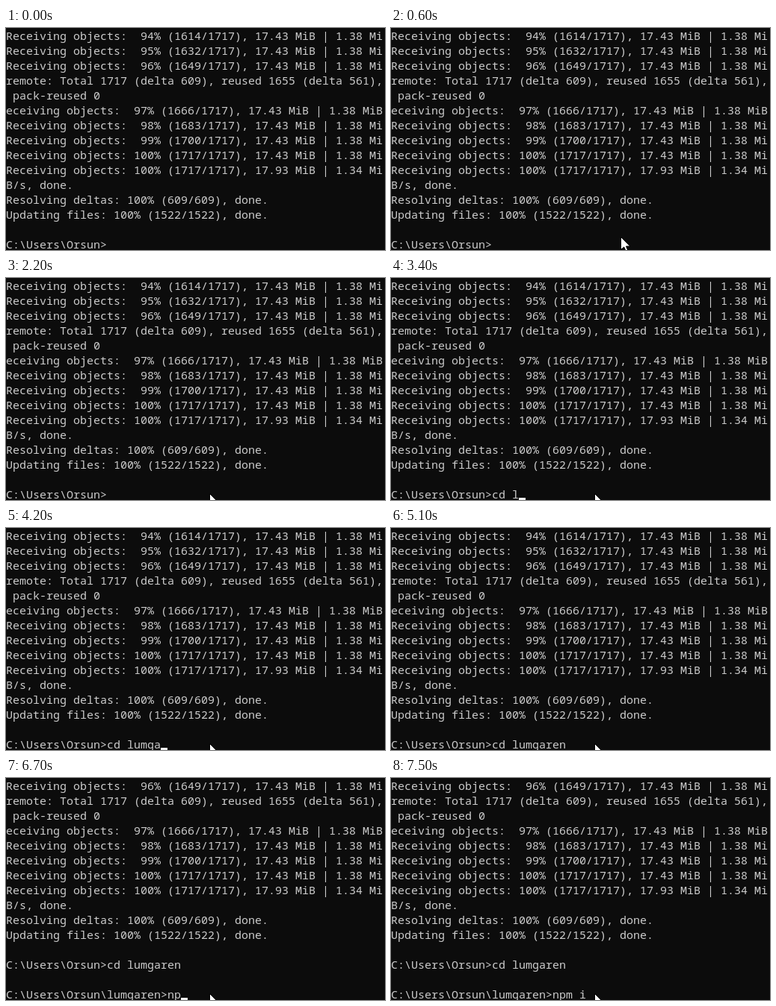
Recreate the animation shown at these times as an HTML page with a canvas. Size 507 px wide and 298 px high, loop 8 s.

```html
<!DOCTYPE html>
<html lang="en">
<head>
<meta charset="utf-8">
<title>Terminal</title>
<style>
html, body { margin: 0; width: 100%; height: 100%; overflow: hidden; background: #0c0c0c; }
canvas { display: block; }
</style>
</head>
<body>
<canvas id="screen" width="507" height="298"></canvas>
<script>
const ctx = document.getElementById("screen").getContext("2d");
const LOOP = 8000, STEP = 100, CELL = 9, ROW = 20, BASE = 16, ROWS = 15;
const HOME = "C:\\Users\\Orsun", DIR = "lumgaren", COMMAND = "cd " + DIR;
const ENTER = 5500;

const receiving = (percent, count, size = "17.43", rate = "1.38") =>
  `Receiving objects: ${String(percent).padStart(3)}% (${count}/1717), ${size} MiB | ${rate} Mi`;

const log = [
  receiving(94, 1614),
  receiving(95, 1632),
  receiving(96, 1649),
  "remote: Total 1717 (delta 609), reused 1655 (delta 561),",
  " pack-reused 0",
  receiving(97, 1666).slice(1) + "B",
  receiving(98, 1683),
  receiving(99, 1700),
  receiving(100, 1717),
  receiving(100, 1717, "17.93", "1.34"),
  "B/s, done.",
  "Resolving deltas: 100% (609/609), done.",
  "Updating files: 100% (1522/1522), done.",
  ""
];

// Key press times for each command, and the times the caret turns on and off
const cdKeys = [2300, 2500, 2700, 3400, 3600, 3800, 4000, 4200, 4300, 4400, 4600];
const npmKeys = [6600, 6700, 6900, 7100, 7300];
const caretSpans = [
  [1700, 2200], [2300, 2800], [3200, 3600], [3800, 4100],
  [4200, 5100], [5500, 6100], [6600, 7000], [7100, 7500]
];

const typed = (text, keys, t) => text.slice(0, keys.filter(k => k <= t).length);

function screenLines(t) {
  if (t < ENTER) return [...log, `${HOME}>` + typed(COMMAND, cdKeys, t)];
  return [...log, `${HOME}>${COMMAND}`, "", `${HOME}\\${DIR}>` + typed("npm i", npmKeys, t)].slice(-ROWS);
}

const arrow = new Path2D("M-.5 -.5V16.5L3.7 13L6.3 18.8L8.9 17.7L6.5 12H11.8Z");

function drawPointer(t) {
  if (t < 200) return;
  const left = 1 - Math.min(1, (t - 200) / 800);
  ctx.save();
  ctx.translate(Math.round(273 + 212 * left ** 2.6), Math.round(290 - 182 * left ** 4.34));
  ctx.fillStyle = "#fff";
  ctx.strokeStyle = "#000";
  ctx.lineWidth = 1;
  ctx.fill(arrow);
  ctx.stroke(arrow);
  ctx.restore();
}

function draw(now) {
  const t = Math.floor(now % LOOP / STEP) * STEP;
  const lines = screenLines(t);
  ctx.fillStyle = "#0c0c0c";
  ctx.fillRect(0, 0, 507, 298);
  ctx.font = '500 15px "Noto Sans Mono", monospace';
  ctx.fillStyle = "#ccc";
  lines.forEach((line, i) => ctx.fillText(line, 0, i * ROW + BASE));
  if (caretSpans.some(([on, off]) => t >= on && t < off)) {
    ctx.fillStyle = "#f2f2f2";
    ctx.fillRect(lines[ROWS - 1].length * CELL, 295, CELL, 3);
  }
  drawPointer(t);
}

let start;
function frame(now) {
  start ??= now;
  draw(now - start);
  requestAnimationFrame(frame);
}
requestAnimationFrame(frame);
</script>
</body>
</html>
```
